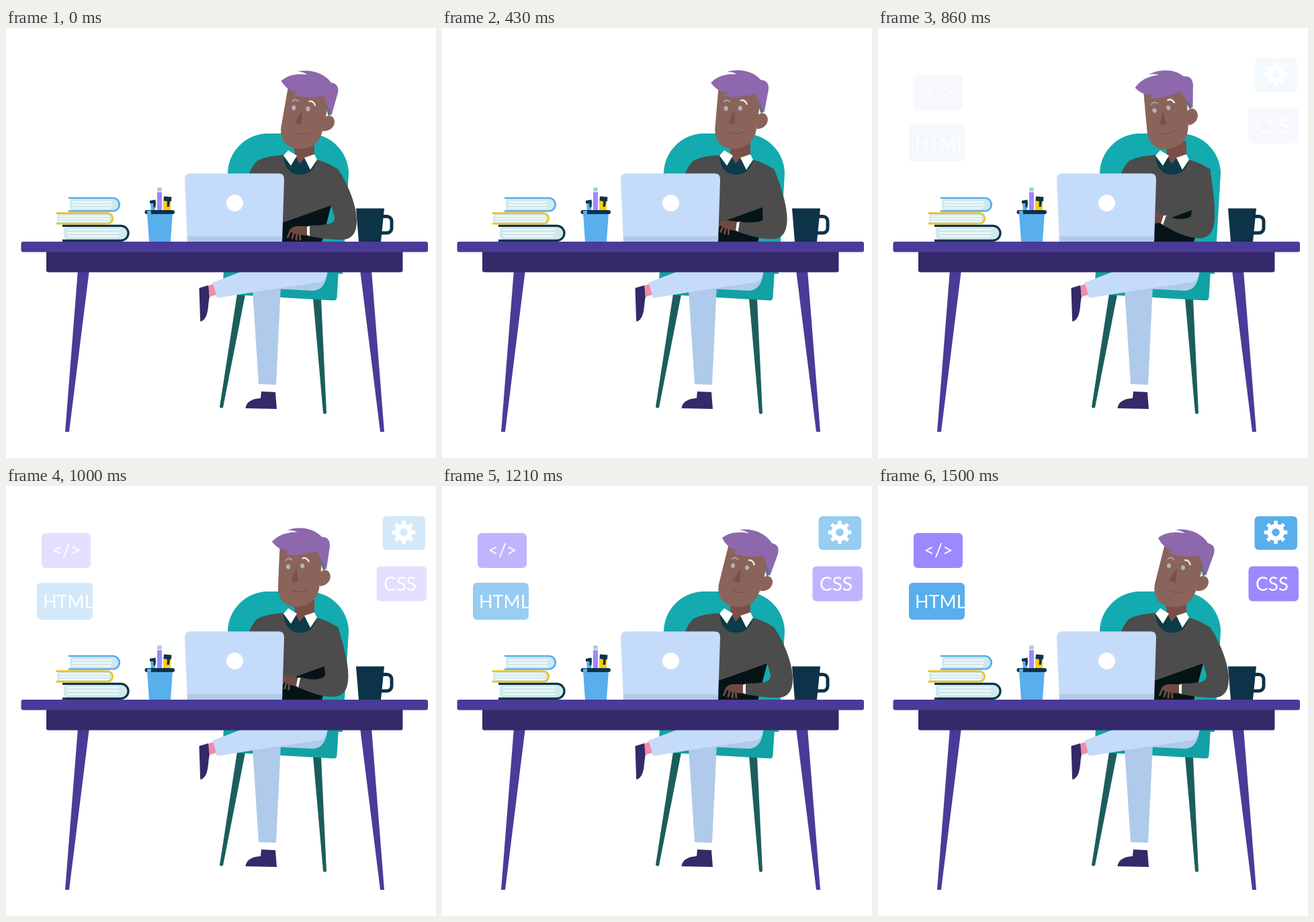
Animation, 640 px wide and 640 px high, one loop 3.07 s. Source, as an HTML page:

```html
<!DOCTYPE html>
<html lang="en">
<head>
<meta charset="utf-8">
<title>Developer at a desk</title>
<style>
  html, body { margin: 0; width: 100%; height: 100%; overflow: hidden; background: #fff; }
  svg { display: block; width: 100%; height: 100%; }
  text { font-family: Lato, sans-serif; fill: #fff; }
  .navy { fill: #0d3349; }
  .blue { fill: #59aeec; }
  .violet { fill: #9d88ff; }
  .indigo { fill: #4a3b98; }
  .plum { fill: #35296a; }
  .wool { fill: #4c4c4c; }
  .denim { fill: #c5dbfa; }
  .shade { fill: #afcaeb; }
  .page { fill: #cfe9ec; }
  .white { fill: #fff; }
  .line { fill: none; stroke: #fff; stroke-width: 1.3; }
  .cover { fill: none; stroke-width: 2.7; }
</style>
</head>
<body>
<svg viewBox="0 0 640 640">
  <!-- chair -->
  <path fill="#13abaf" d="M330 217C330 184 357 157 390 157H449C483 157 510 184 510 217L501 366H335Z"/>
  <path fill="#1b5e5c" d="M344 396L356 397 323 565Q320 567 318 564ZM457 402L469 403 477 573Q474 576 472 573Z"/>
  <path fill="#12a1a4" d="M324 360L322 396 487 405.500Q492 406 492.500 401L495 360Z"/>

  <!-- legs -->
  <path class="shade" d="M367 390L409 384 402 531 376 530Z"/>
  <path class="shade" d="M396 388L456 391C470 391 477 380 479 360H400Z"/>
  <path class="denim" d="M357 360L307 379 314 402 382 391 470 378Q477 373 478 360Z"/>
  <path fill="#f58aa4" d="M300 384L308 381 313 397 304 400Z"/>
  <path class="plum" d="M287.500 387L301 383 303 400C300 410 303 432 290 437Q289 437 289 432Z"/>
  <path class="plum" d="M380 541L401 542 403 567 356.500 566C358 556 366 552 379 551Z"/>

  <!-- torso -->
  <path class="wool" d="M361 218Q368 202 375 197 390 190 413 189L463 196Q481 201 495 211L484 264 470 320H361Z"/>
  <path id="gap" fill="#051417"/>
  <g id="hand">
    <path fill="#6f4a43" d="M449 295L432 295Q424 296 422 303L430 306 438 308 449 309Z"/>
    <path fill="none" stroke="#6f4a43" stroke-width="3" stroke-linecap="round"
      d="M424 300L419.500 311M429 303L426 313M433 304L432 315M437 306L438 315"/>
    <path class="white" d="M448 296L453 294 452 310 448 308Z"/>
  </g>
  <path id="arm" class="wool"/>
  <path fill="#0d3b4a" d="M413 190Q415 218 438 218.500 457 218 463 196Z"/>
  <path fill="#7a4f48" d="M428 172L459 168V190L444 194 437 202 430 189Z"/>
  <path class="white" d="M420 182L413 190 424 205 433 190ZM459 188L463 196 453 211 444 193Z"/>

  <g id="head">
    <path fill="#8a645b" d="M427 86L412 146C408 168 422 180 440 180 455 180 467 174 473 156L490 100Z"/>
    <path fill="#8a645b" d="M478 136C486 131 492 136 492 143 492 151 484 158 473 156Z"/>
    <path fill="#5a7280" d="M481 118L488 124 487 133 483 134Z"/>
    <path fill="#8d68ad" d="M417 77C427 70 438 67 457 70.500Q451 66 442 65C462 62 482 70 491 85 500 87 502 93 500 101L488 134 479 104C462 106 446 105 433 99L441 95C431 95 422 88 417 77Z"/>
    <path fill="none" stroke="#b0a19f" stroke-width="2" d="M431 109Q436 104 441 110"/>
    <path fill="none" stroke="#f2eeee" stroke-width="2.200" d="M456 110.500Q463 109 465 118"/>
    <ellipse fill="#b0b4b8" cx="433" cy="118.500" rx="3" ry="3.600"/>
    <ellipse fill="#b0b4b8" cx="454" cy="121.500" rx="3" ry="3.600"/>
    <path fill="#7d4f4a" d="M445 122L433 141 443 144Z"/>
    <path fill="none" stroke="#7d4f4a" stroke-width="1.200" d="M432 155Q444 161 455 157"/>
  </g>

  <!-- desk -->
  <path class="indigo" d="M107 360H124L94 601H88ZM527 360H544L563 601H557Z"/>
  <rect class="plum" x="60" y="325" width="530.500" height="38.500" rx="3"/>
  <rect class="indigo" x="22.500" y="318" width="605.500" height="15.500" rx="3"/>

  <!-- laptop -->
  <path class="denim" d="M274 216.500H406Q414.500 216.500 414 226L411 318H270L266 226Q266 216.500 274 216.500Z"/>
  <path fill="#b0cae9" d="M269.600 310H411.200L411 318H270Z"/>
  <circle class="white" cx="340.500" cy="260.500" r="12.500"/>

  <!-- books -->
  <path class="page" d="M89 294H171A11 11 0 0 1 171 316H89Q82 305 89 294Z"/>
  <path class="line" d="M91 300H168M91 305H168M91 310H168"/>
  <path class="cover" stroke="#0d3349" style="stroke-width:3.200" d="M84 294.300H171A11 11 0 0 1 171 316.400H84"/>
  <path class="page" d="M78 276H152V291H78Q74 283 78 276Z"/>
  <path class="page" d="M150 276A8 7.500 0 0 1 150 291Z"/>
  <path class="line" d="M79 280H154M79 284H154M79 288H154"/>
  <path class="cover" stroke="#ebc41e" d="M74.500 275.700H151A7.700 7.700 0 0 1 151 291.200H74.500"/>
  <path class="page" d="M97 253H159A9.700 9.700 0 0 1 159 272.500H97Q93 263 97 253Z"/>
  <path class="line" d="M99 259H157M99 263.500H157M99 268H157"/>
  <path class="cover" stroke="#59aeec" d="M93 253H159A9.700 9.700 0 0 1 159 272.500H93"/>

  <!-- pens -->
  <path class="blue" d="M215 260L223 260 222 273H216ZM210 275H248L245 318H213Z"/>
  <path class="navy" d="M214 257L222.500 255.500 223 261 222 267H219.500V261H214Z"/>
  <rect class="violet" x="225" y="244" width="7" height="28"/>
  <rect fill="#e4e0ff" x="225" y="242" width="7" height="2.500"/>
  <rect fill="#9fced0" x="225.300" y="237.500" width="6.500" height="5" rx="1"/>
  <rect fill="#ffcc05" x="234" y="256" width="11" height="16"/>
  <path class="navy" d="M235 250.500L246.500 251.500 246 258 244 258 243 266H239.500L240 258 234.500 257Z"/>
  <rect class="navy" x="206.500" y="271" width="44.500" height="6" rx="3"/>
  <rect class="blue" x="210" y="272" width="6" height="6"/>

  <!-- mug -->
  <path class="navy" d="M521 268.500H563L558 318H525Z"/>
  <rect x="552" y="280.500" width="22" height="24.500" rx="7" fill="none" stroke="#0d3349" stroke-width="5"/>

  <g id="cards">
    <rect class="violet" x="53" y="70" width="73" height="52" rx="6"/>
    <text x="90" y="105" font-size="27" text-anchor="middle">&lt;/&gt;</text>
    <rect class="blue" x="46" y="144" width="83" height="55" rx="6"/>
    <text x="55" y="181.500" font-size="27">HTML</text>
    <rect class="blue" x="560.500" y="45" width="63.500" height="50" rx="6"/>
    <g id="gear" transform="translate(592 69)" stroke="#fff" fill="none">
      <circle r="9.300" stroke-width="7"/>
    </g>
    <rect class="violet" x="551.500" y="119.500" width="74.500" height="52" rx="6"/>
    <text x="586.500" y="156" font-size="28" text-anchor="middle">CSS</text>
  </g>
</svg>
<script>
const LOOP = 3070, FPS = 14;
const $ = id => document.getElementById(id);
const set = (id, name, value) => $(id).setAttribute(name, value);
const ramp = (k, from, to) => Math.min(1, Math.max(0, (k - from) / (to - from)));

// Two poses of each path: arm drawn in, arm reaching out
const poses = {
  arm: [
    'M467 271L470 205L494 209C499 240 502 268 501 283C500 302 494 313 478 313C462 313 442 304 424 293L429 279C440 284 447 285 455 284C461 283 465 282 466 279Z',
    'M484 264L470 205L494 210C508 230 522 264 522 287C522 304 516 315 499 315C484 315 468 313 452 310L452 294C465 294 472 293 479 292C486 291 490 286 489 281Z'
  ],
  gap: [
    'M411 292L467 271L478 285L470 318L411 318Z',
    'M411 290L484 264L477 290L470 318L411 318Z'
  ]
};

function blend([a, b], q) {
  const ends = b.match(/\d+/g);
  let i = 0;
  return a.replace(/\d+/g, n => (+n + (ends[i++] - n) * q).toFixed(2));
}

for (let a = 0; a < 360; a += 45) {
  $('gear').insertAdjacentHTML('beforeend',
    `<path stroke-width="5.500" d="M0 -11V-17.300" transform="rotate(${a})"/>`);
}

function draw(t) {
  const k = Math.floor((t + 5) * FPS / 1000);
  const back = ramp(k, 12, 17);
  const reach = k < 12 ? 1 - ramp(k, 2, 12) : back;
  const lean = k < 12 ? 0.79 * (1 - ramp(k, 3, 12)) : back;
  const u = ramp(k, 11, 21);

  for (const id in poses) set(id, 'd', blend(poses[id], reach));
  const r = 1 - reach;
  set('hand', 'transform', `translate(${-25 * r} ${-16.5 * r}) rotate(${18 * r} 450 302)`);
  set('head', 'transform', `rotate(${-19.3 * (1 - lean)} 435 184)`);
  set('cards', 'opacity', (u + u * u * (3 - 2 * u)) / 2);
}

let start;
function tick(now) {
  start ??= now;
  draw((now - start) % LOOP);
  requestAnimationFrame(tick);
}
draw(0);
requestAnimationFrame(tick);
</script>
</body>
</html>
```
